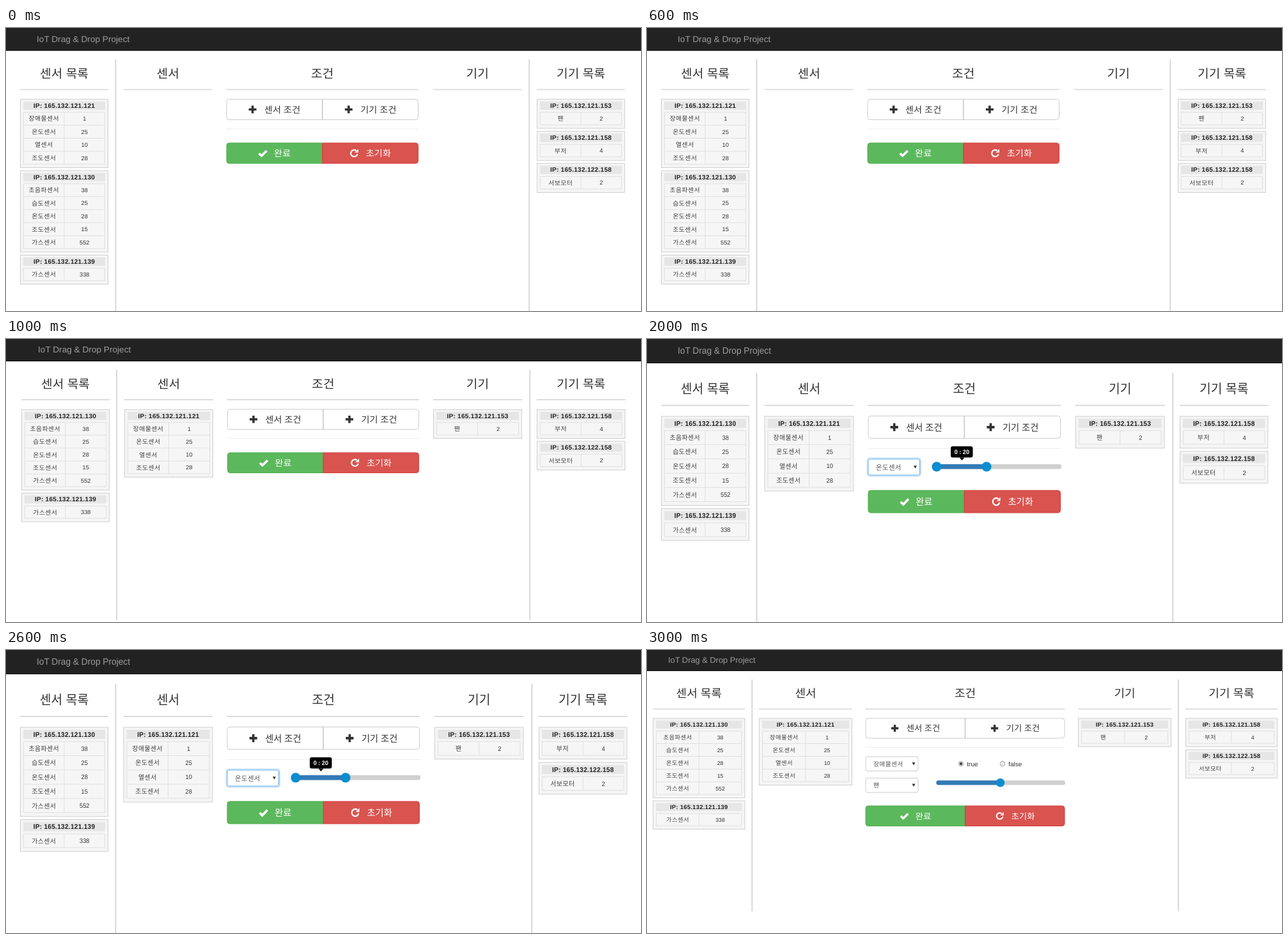
Animation of 993x443 px, one loop 4 s. Source, as an HTML page:

```html
<!DOCTYPE html>
<html lang="ko">
<head>
<meta charset="utf-8">
<title>IoT Drag &amp; Drop Project</title>
<style>
  html, body { margin: 0; width: 100%; height: 100%; overflow: hidden; background: #fff; }
  svg { display: block; width: 100vw; height: 100vh; }
  text {
    font-family: "Liberation Sans", Arial, "Noto Sans CJK KR", "Noto Sans CJK", sans-serif;
    text-rendering: geometricPrecision;
  }
</style>
</head>
<body>
<svg id="stage" viewBox="0 0 993 443" preserveAspectRatio="none"></svg>
<script>
const stage = document.getElementById('stage');
const SCENE_MS = 1000;

const boards = {
  obstacle: ['165.132.121.121', [['장애물센서', 1], ['온도센서', 25], ['열센서', 10], ['조도센서', 28]]],
  sonic: ['165.132.121.130', [['초음파센서', 38], ['습도센서', 25], ['온도센서', 28], ['조도센서', 15], ['가스센서', 552]]],
  gas: ['165.132.121.139', [['가스센서', 338]]],
  fan: ['165.132.121.153', [['팬', 2]]],
  buzzer: ['165.132.121.158', [['부저', 4]]],
  servo: ['165.132.122.158', [['서보모터', 2]]]
};
const titles = ['센서 목록', '센서', '조건', '기기', '기기 목록'];
const before = [['obstacle', 'sonic', 'gas'], [], [], [], ['fan', 'buzzer', 'servo']];
const after = [['sonic', 'gas'], ['obstacle'], [], ['fan'], ['buzzer', 'servo']];

// k: text scale, v: vertical scale of the view, cols: [left, right] of each column
const scenes = [
  { k: 1, v: .98, bar: 35.5, title: [48, 17], rules: [171.5, 818.3], ruleY: [49, 443],
    cols: [[22, 160], [184, 322.5], [344.5, 645], [668, 806.5], [830, 968]],
    head: 71, hr: 96.3, top: 111, row: 20.5, lists: before,
    add: [111, 144], hr2: 158, done: [179.5, 212.5] },
  { k: 1, v: .97, bar: 35, title: [50, 16], rules: [173, 819.3], ruleY: [48, 440],
    cols: [[24, 162], [185, 324], [346, 646], [668, 807], [830, 968.5]],
    head: 69.7, hr: 95, top: 110, row: 20.25, lists: after,
    add: [109.5, 142], hr2: 155.7, done: [177.5, 210] },
  { k: 1.005, v: 1.05, bar: 38, title: [48, 18], rules: [171.5, 822.3], ruleY: [53, 443],
    cols: [[22, 160], [183.5, 323.5], [345.5, 647], [670, 809.5], [833, 971.5]],
    head: 77, hr: 104, top: 120.5, row: 22.4, lists: after,
    add: [120, 156], hr2: 171.5, done: [236.5, 272.5], extra: rangeForm },
  { k: .94, v: .98, bar: 33, title: [33, 15.3], rules: [164.3, 831], ruleY: [46, 409],
    cols: [[9, 153.5], [175, 321], [341.5, 653.5], [674, 820], [842, 986]],
    head: 67.5, hr: 92.3, top: 106.5, row: 20, lists: after,
    add: [106.5, 138.5], hr2: 152.5, done: [243.5, 276], extra: switchForm }
];

let s;

const rect = (x, y, w, h, fill, more = '') =>
  `<rect x="${x}" y="${y}" width="${w}" height="${h}" fill="${fill}" ${more}/>`;
const line = (x1, y1, x2, y2, color, width = 1) =>
  `<path d="M${x1} ${y1}L${x2} ${y2}" stroke="${color}" stroke-width="${width}"/>`;
const box = (x, y, w, h, fill, stroke, r = 0) =>
  rect(x + .5, y + .5, w - 1, h - 1, fill, `stroke="${stroke}" rx="${r}"`);

// Text centred vertically on cy
function text(x, cy, str, size, { fill = '#333', anchor = 'middle', weight = 400, gap = 0 } = {}) {
  const px = size * s.k;
  const lift = (/[가-힣]/.test(str) ? .38 : .36) * px * s.v;
  const safe = String(str).replace('&', '&amp;');
  return `<text transform="translate(${x} ${cy + lift}) scale(1 ${s.v})" font-size="${px}"
    fill="${fill}" text-anchor="${anchor}" font-weight="${weight}" letter-spacing="${gap}">${safe}</text>`;
}

function icon(x, y, body) {
  return `<g transform="translate(${x} ${y}) scale(${s.k} ${s.k * s.v})">${body}</g>`;
}
const plus = '<path d="M-6 0H6M0-6V6" stroke="#333" stroke-width="3.6"/>';
const check = '<path d="M-6 .3L-2 4.2L6-3.8" fill="none" stroke="#fff" stroke-width="3.6"/>';
const repeat = '<path d="M5.3 1.2A5.3 5.3 0 1 1 3.4-4.1" fill="none" stroke="#fff" stroke-width="2.2"/>' +
  '<path d="M6.6-6.6V-.9H.9Z" fill="#fff"/>';

const cardHeight = rows => s.row * (rows.length + 1.27);

function card(x, y, w, [ip, rows]) {
  const { row } = s, mid = x + w / 2, top = y + row, bottom = top + rows.length * row;
  let out = box(x, y, w, cardHeight(rows), '#f5f5f5', '#cfcfcf');
  out += rect(x + 5, y + row * .2, w - 10, row * .63, '#e6e6e6');
  out += text(mid, y + row * .51, 'IP: ' + ip, 10.1, { fill: '#222', weight: 700, gap: .25 });
  out += box(x + 5, top, w - 10, bottom - top, '#f6f6f6', '#e0e0e0');
  out += line(mid, top, mid, bottom, '#e0e0e0');
  rows.forEach(([name, value], i) => {
    const cy = top + (i + .5) * row;
    if (i) out += line(x + 5, top + i * row, x + w - 5, top + i * row, '#e0e0e0');
    out += text(x + w * .27, cy, name, 9.9, { fill: '#404040', gap: .4 });
    out += text(x + w * .73, cy, value, 9.3);
  });
  return out;
}

function column([l, r], i) {
  let out = text((l + r) / 2, s.head, titles[i], 19.2);
  out += line(l, s.hr, r, s.hr, '#dcdcdc', 1.8);
  let y = s.top;
  for (const id of s.lists[i]) {
    out += card(l, y, r - l, boards[id]);
    y += cardHeight(boards[id][1]) + s.row * .18;
  }
  return out;
}

function buttons() {
  const [l, r] = s.cols[2], mid = (l + r) / 2, q = (r - l) / 4, k = s.k;
  const [a, b] = s.add, [c, d] = s.done, ay = (a + b) / 2, dy = (c + d) / 2;
  const white = { fill: '#fff' };
  const half = (x, dir, fill, edge) => `<path d="M${mid} ${c + .5}H${x - 4 * dir}
    Q${x} ${c + .5} ${x} ${c + 4.5}V${d - 4.5}Q${x} ${d - .5} ${x - 4 * dir} ${d - .5}H${mid}Z"
    fill="${fill}" stroke="${edge}"/>`;
  return box(l, a, r - l, b - a, '#fff', '#ccc', 4) + line(mid, a, mid, b, '#c4c4c4', 1.4) +
    icon(mid - q - 34 * k, ay, plus) + text(mid - q + 12.5, ay, '센서 조건', 14.2) +
    icon(mid + q - 34 * k, ay, plus) + text(mid + q + 12.5, ay, '기기 조건', 14.2) +
    line(l, s.hr2, r, s.hr2, '#eee') +
    half(l + .5, -1, '#5cb85c', '#4cae4c') + half(r - .5, 1, '#d9534f', '#d43f3a') +
    icon(mid - q - 18 * k, dy, check) + text(mid - q + 12.5, dy, '완료', 14.2, white) +
    icon(mid + q - 25.5 * k, dy, repeat) + text(mid + q + 12.5, dy, '초기화', 14.2, white);
}

function select(x, y, w, h, label, focus) {
  const cy = y + h / 2, ax = x + w - 7.5;
  return (focus ? rect(x - 1, y - 1, w + 2, h + 2, 'none', 'rx="4" stroke="#c5e1f8" stroke-width="2"') : '') +
    box(x, y, w, h, '#fff', focus ? '#66afe9' : '#ccc', 3) +
    text(x + 12.5, cy, label, 10.4, { fill: '#555', anchor: 'start', gap: .35 }) +
    `<path d="M${ax - 2.5} ${cy - 2.2}h5l-2.5 4.4Z" fill="#333"/>`;
}

function slider(x, end, y, h, to, knobs, r) {
  return rect(x, y - h / 2, end - x, h, '#d0d0d0', 'rx="3"') +
    rect(x, y - h / 2, to - x, h, '#337ab7', 'rx="3"') +
    knobs.map(cx => `<circle cx="${cx}" cy="${y}" r="${r}" fill="#0c8dd0"/>`).join('');
}

function rangeForm() {
  return select(345.5, 187.5, 81.5, 26, '온도센서', true) +
    slider(453, 648, 199.8, 7.6, 531, [453, 531], 7.6) +
    rect(475, 168, 34.5, 17.5, '#000', 'rx="3"') +
    '<path d="M488.5 185.5h8l-4 4.5Z"/>' +
    text(492.3, 176.7, '0 : 20', 9.1, { fill: '#fff', weight: 700 });
}

function radio(x, y, label, on) {
  return `<circle cx="${x}" cy="${y}" r="3.8" fill="#eee" stroke="#999" stroke-width=".9"/>` +
    (on ? `<circle cx="${x}" cy="${y}" r="2.2" fill="#444"/>` : '') +
    text(x + 9.3, y, label, 10.6, { anchor: 'start' });
}

function switchForm() {
  return select(341.5, 166.5, 83, 23.5, '장애물센서') +
    select(341.5, 200, 83, 23.5, '팬') +
    radio(491, 178, 'true', true) + radio(556, 178, 'false', false) +
    slider(452.5, 654, 207.8, 7, 552.5, [552.5], 6.8);
}

function render(scene) {
  s = scene;
  const [tx, ty] = s.title;
  stage.innerHTML = rect(0, 0, 993, 443, '#fff') +
    rect(0, 0, 993, s.bar, '#222') + rect(0, s.bar - 1, 993, 1, '#0c0c0c') +
    text(tx, ty, 'IoT Drag & Drop Project', 13.65, { fill: '#9d9d9d', anchor: 'start' }) +
    s.rules.map(x => line(x, s.ruleY[0], x, s.ruleY[1], '#d8d8d8', 2)).join('') +
    s.cols.map(column).join('') + buttons() + (s.extra ? s.extra() : '');
}

let shown = -1;
function tick() {
  const i = Math.floor(performance.now() / SCENE_MS) % scenes.length;
  if (i !== shown) render(scenes[shown = i]);
  requestAnimationFrame(tick);
}
tick();
</script>
</body>
</html>
```
